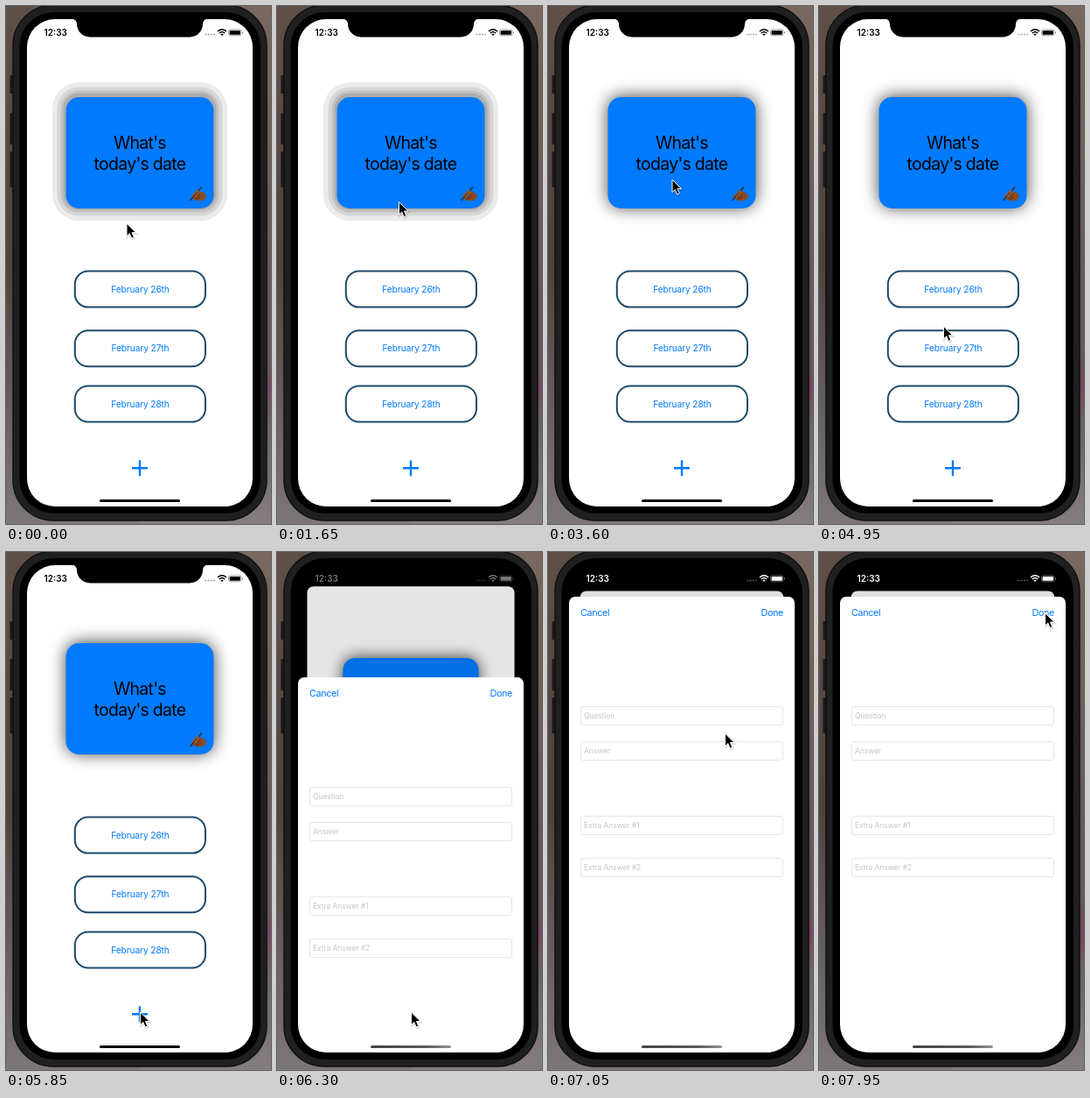
Recreate the animation shown at these times as an HTML page. Size 303 by 591 pixels, loop 8000 ms.

```html
<!DOCTYPE html>
<html lang="en">
<head>
<meta charset="utf-8">
<title>Flashcard app</title>
<style>
  html, body { margin: 0; width: 100%; height: 100%; overflow: hidden; background: #000; }
  svg { display: block; width: 100vw; height: 100vh; }
  text { font-family: Inter, "Open Sans", sans-serif; }
  .card { font-size: 19.5px; letter-spacing: -.72px; text-anchor: middle; }
  .option { font-size: 10.2px; letter-spacing: -.1px; text-anchor: middle; fill: #007aff; }
  .bar { font-size: 10.8px; letter-spacing: -.38px; fill: #007aff; }
  .hint { font-size: 8.6px; letter-spacing: -.13px; fill: #c5c5c7; }
  .clock { font-size: 10px; font-weight: 600; }
</style>
</head>
<body>
<svg viewBox="0 0 303 591" preserveAspectRatio="none">
  <defs>
    <linearGradient id="left" x2="0" y2="1">
      <stop stop-color="#5f4f47"/>
      <stop offset=".5" stop-color="#4f433d"/>
      <stop offset=".75" stop-color="#655c5c"/>
      <stop offset="1" stop-color="#7d7678"/>
    </linearGradient>
    <linearGradient id="right" x2="0" y2="1">
      <stop stop-color="#78685f"/>
      <stop offset=".5" stop-color="#685a55"/>
      <stop offset=".68" stop-color="#66575c"/>
      <stop offset=".74" stop-color="#784866"/>
      <stop offset=".8" stop-color="#6c6166"/>
      <stop offset="1" stop-color="#847d80"/>
    </linearGradient>
    <linearGradient id="grip">
      <stop stop-color="#444"/>
      <stop offset=".7" stop-color="#5c5c5c"/>
      <stop offset="1" stop-color="#929292"/>
    </linearGradient>
    <filter id="blur" x="-30%" y="-40%" width="160%" height="180%">
      <feGaussianBlur stdDeviation="9.5"/>
    </filter>
    <clipPath id="screen"><rect x="24" y="15" width="258" height="556" rx="32"/></clipPath>
  </defs>

  <rect width="152" height="591" fill="url(#left)"/>
  <rect x="152" width="151" height="591" fill="url(#right)"/>

  <g fill="#1b1b1d">
    <rect x="4.500" y="79" width="5" height="21" rx="1"/>
    <rect x="4.500" y="122" width="5" height="36" rx="1"/>
    <rect x="4.500" y="166" width="5" height="41" rx="1"/>
  </g>
  <rect x="8" y="-1" width="290" height="588" rx="46" fill="#202021" stroke="#101011" stroke-width="1.500"/>
  <rect x="15.500" y="7" width="275.500" height="572" rx="39"/>

  <g clip-path="url(#screen)">
    <g id="home">
      <rect x="24" y="15" width="258" height="570" rx="8" fill="#fff"/>
      <g id="bands"></g>
      <rect id="glow" x="68.500" y="103" width="169" height="127" rx="15" opacity=".72" filter="url(#blur)"/>
      <rect id="card" x="68.500" y="104" width="169" height="127" rx="15"/>
      <g id="question" class="card">
        <text x="153" y="163">What's</text>
        <text x="153" y="186.500">today's date</text>
      </g>
      <text id="answer" class="card" x="153" y="175">February 27th</text>
      <g id="hand" fill="none" stroke-linecap="round">
        <path d="M213 216.500Q216 212 219.500 210.500L226 213Q229.500 215 228.500 219Q227 222.500 221 222.300Q215 222.300 213.500 219.500Z" fill="#8a4b25"/>
        <path d="M211 221.500L223.500 207" stroke="#33363c" stroke-width="1.800"/>
        <path d="M212.500 217L218 211.500Q220.500 210 220 212.500L215.500 218" stroke="#9a5a30" stroke-width="1.500"/>
        <path d="M216.500 219.500L222 215M217.500 221L222.500 218" stroke="#54280f" stroke-width=".8"/>
      </g>
      <g id="options"></g>
      <path d="M144 527.300H162M153 518.300V536.300" stroke="#007aff" stroke-width="2.400"/>
      <rect id="dim" x="24" y="14" width="258" height="572"/>
    </g>

    <g id="sheet">
      <rect x="24" width="258" height="640" rx="7" fill="#fff"/>
      <text class="bar" x="37" y="21.800">Cancel</text>
      <text class="bar" x="269" y="21.800" text-anchor="end">Done</text>
    </g>
  </g>

  <path d="M75 14.500A6 6 0 0 1 81 20.500A15 15 0 0 0 96 35.500H210A15 15 0 0 0 225 20.500A6 6 0 0 1 231 14.500Z"/>
  <g id="status">
    <text class="clock" x="43.500" y="34">12:33</text>
    <path d="M227.500 32.500H239" stroke="currentColor" opacity=".35" stroke-width="1.500" stroke-dasharray="2 1.200"/>
    <g fill="none" stroke="currentColor" stroke-width="1.500">
      <path d="M242 29Q247 24.500 252 29M243.800 31Q247 28 250.200 31"/>
      <path d="M247 33.800L245.700 32.300Q247 31.300 248.300 32.300Z" fill="currentColor" stroke-width=".5"/>
      <rect x="254.500" y="26.800" width="14.500" height="7" rx="2" stroke-width=".6" opacity=".6"/>
    </g>
    <rect x="255.600" y="27.900" width="12.300" height="4.800" rx="1"/>
    <path d="M270 29V31.800Q271.300 30.400 270 29Z"/>
  </g>
  <rect id="indicator" x="107" y="563" width="92" height="3" rx="1.500"/>

  <g id="cursor">
    <path d="M0 0V14.500L3.300 11.500L5.600 17L8.300 15.900L6 10.500H10.500Z" transform="translate(.6 1.2)" stroke="#0002" stroke-width="2" fill="none"/>
    <path d="M0 0V14.500L3.300 11.500L5.600 17L8.300 15.900L6 10.500H10.500Z" stroke="#fff" stroke-linejoin="round"/>
  </g>
</svg>

<script>
const LOOP = 8000, STEP = 150;
const $ = id => document.getElementById(id);
const add = (id, markup) => $(id).insertAdjacentHTML('beforeend', markup);
const show = (id, on) => $(id).setAttribute('visibility', on ? 'visible' : 'hidden');

// Stepped card shadow, widest band first
[[15.5, '#ebebeb'], [10, '#d6d6d6'], [6, '#c2c2c2'], [3, '#acacac']].forEach(([d, fill]) =>
  add('bands', `<rect x="${68.5 - d}" y="${102.5 - d}" width="${169 + 2 * d}" height="${127 + 2 * d}" rx="${15 + d}" fill="${fill}"/>`));

[302.6, 370.3, 433.5].forEach((y, i) => add('options', `
  <rect x="78.8" y="${y}" width="149.2" height="41" rx="15" fill="#fff" stroke="#1c4a6b" stroke-width="2"/>
  <text class="option" x="153.5" y="${y + 24}">February ${26 + i}th</text>`));

[['Question', 125.5], ['Answer', 165.5], ['Extra Answer #1', 250.5], ['Extra Answer #2', 298.5]].forEach(([label, y]) => add('sheet', `
  <rect x="37.5" y="${y}" width="231" height="21" rx="2.5" fill="#fff" stroke="#e6e6e8"/>
  <text class="hint" x="41" y="${y + 13.8}">${label}</text>`));

// Pointer way-points: time, x, y
const path = [
  [0, 138, 248], [150, 137, 249], [1350, 137, 249], [1950, 142, 198],
  [4200, 142, 198], [4350, 143.5, 222], [4650, 139, 345], [4800, 139, 345],
  [5400, 161, 475], [5850, 153.5, 525], [6300, 153.5, 525], [7050, 202.5, 207],
  [7650, 263, 88], [7950, 258.5, 69.5]
];

function pointerAt(t) {
  const i = path.findIndex(p => p[0] > t);
  if (i < 0) return path[path.length - 1].slice(1);
  const [t0, x0, y0] = path[i - 1], [t1, x1, y1] = path[i];
  const u = (t - t0) / (t1 - t0), e = u * u * (3 - 2 * u);
  return [x0 + (x1 - x0) * e, y0 + (y1 - y0) * e];
}

// Critically damped spring of the modal sheet
function sheetAt(t) {
  if (t < 6150) return 0;
  const w = (t - 6085) * .0147;
  return 1 - (1 + w) * Math.exp(-w);
}

function draw(now) {
  const t = Math.floor(now % LOOP / STEP) * STEP;
  const answered = t >= 2250 && t < 3600;
  show('question', !answered);
  show('answer', answered);
  show('bands', t < 3600);
  show('glow', t >= 3600);
  $('card').setAttribute('fill', !answered ? '#007aff' : t < 2400 ? '#0077f0' : '#0074e2');

  const p = sheetAt(t), scale = 1 - .099 * p;
  $('home').setAttribute('transform', `translate(153 ${15 + 29.4 * p}) scale(${scale}) translate(-153 -15)`);
  $('dim').setAttribute('opacity', .125 * p);
  $('sheet').setAttribute('transform', `translate(0 ${Math.round(51 + 520 * (1 - p))})`);
  show('sheet', p > 0);

  const level = Math.round(255 * p ** 4), ink = `rgb(${level},${level},${level})`;
  $('status').setAttribute('fill', ink);
  $('status').setAttribute('color', ink);
  $('indicator').setAttribute('fill', p > 0 ? 'url(#grip)' : '#000');
  $('cursor').setAttribute('transform', `translate(${pointerAt(t)})`);
  requestAnimationFrame(() => draw(performance.now()));
}
draw(0);
</script>
</body>
</html>
```
